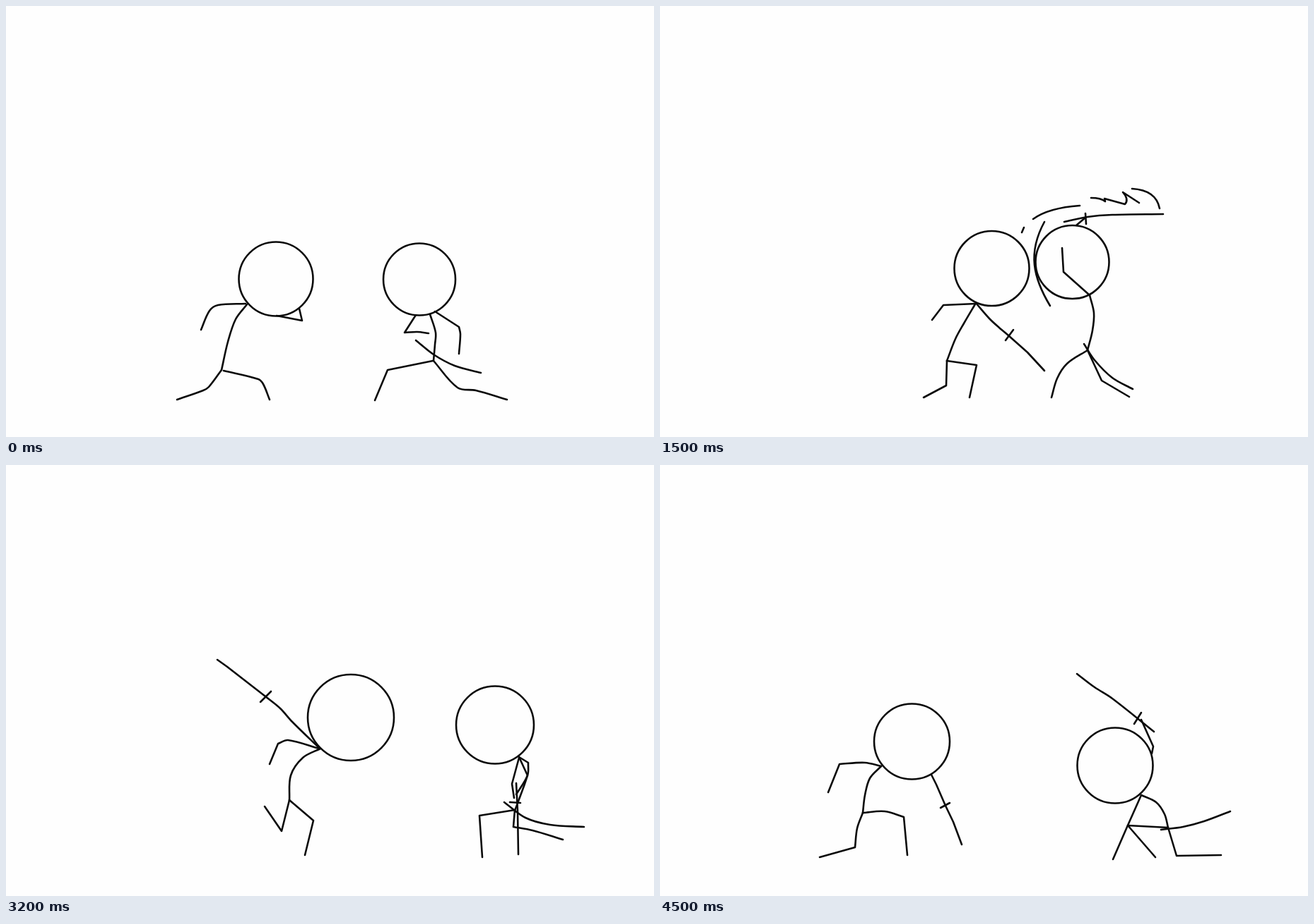
An HTML page with a canvas for the animation above (5000 ms loop, 917 by 611 pixels).

```html
<!DOCTYPE html>
<html lang="en">
<head>
<meta charset="utf-8">
<title>Stick duel</title>
<style>
  html, body { margin: 0; width: 100%; height: 100%; overflow: hidden; background: #fefefe; }
  canvas { display: block; }
</style>
</head>
<body>
<canvas id="stage" width="917" height="611"></canvas>
<script>
const ctx = document.getElementById('stage').getContext('2d');
const LOOP = 5000, STEP = 100, HOLD = 200;

// Each pose: head (x y r) | body | arm | arm | leg | leg | sword | guard | sheath
const left = {
  stance: '382 387 52.5|341 423 325 444 314 476 305 516|339 422 300 424 288 432 276 459|383 439 419 446 415 429|305 516 287 540 279 545 242 558|308 517 357 529 364 536 373 558|||',
  strike: '435.5 370 52.5|417 421 408 450 402 475 399 492|417 421 381 430 370 460|417 421 430 430 462 457 486 477|399 492 374 558|399 492 436 520 438 557|492 484 545 535|480 489 498 475|',
  guard: '469.5 372 53|447 421 430 450 418 472 406 503|447 422 401 424 385 445|447 421 466 443 480 456 493 467|406 503 405 538 373 555|406 503 448 509 438 555|493 467 520 491 544 517|489 474 500 459|',
  lunge: '179.5 388 57.5|152 440 140 460 132 475 122 505|152 440 115 468 146 480|211 437 215 437|122 505 141 523 80 566|122 505 155 508 186 520 225 557|215 437 281 452|210 445 218 432|',
  raise: '488 358 61|445 402 420 415 403 440 401 475|443 402 399 390 385 395 373 424|444 402 405 364 388 345 367 328|401 475 390 519 366 484|401 475 435 504 423 553|367 328 313 286 299 276|360 336 375 321|',
  leap: '552 172 60|536 231 520 347|536 231 507 280 480 252|536 231 580 218 667 183|520 347 464 315 479 364|520 347 505 390 492 433|667 183 768 145|661 169 673 194|',
  land: '356.5 392 53.5|313 427 297 444 290 468 287 493|313 427 290 422 254 424 238 464|384 439 391 453 404 483|287 493 279 515 276 542 226 556|287 493 318 491 345 499 350 553|404 483 415 506 427 538|397 486 410 479|'
};
const right = {
  stance: '585 387.5 51|600 437 608 463 607 480 605 503|607 433 641 455 643 465 641 493|580 438 564 463 582 462 598 464|604 503 540 516 522 559|605 503 639 541 665 545 709 558|||580 474 605 494 635 510 672 520',
  block: '676 376 47|668 423 665 443 650 462 626 485|667 423 637 436 607 420|667 423 633 446 608 422|626 485 597 497 590 515 585 546|626 485 603 511 606 556|591 431 686 377|612 415 620 424|622 480 635 496 650 514 686 525',
  swing: '583.5 363 52|608 410 614 435 612 460 605 488|608 410 571 377 569 343|589 311 602 300|605 488 576 507 562 528 554 555|605 488 625 531 664 554|572 306 605 299 640 296 712 295|602 294 603 309|600 479 615 502 640 527 669 543',
  ready: '733.5 364 53|755 414 768 452 774 475 772 492|753 414 736 437 709 476|753 414 745 430 728 458 709 476|772 492 712 501 668 560|771 492 773 527 800 531 830 554|610 426 650 452 680 465 726 482|692 472 700 462|761 484 790 499 820 508 854 518',
  brace: '692 368.5 55|726 414 738 440 733 455 720 490|726 414 739 422 738 440 722 467|726 415 716 452 719 472|720 489 670 497 674 556|720 489 718 513 745 518 788 531|722 451 724 490 725 552|713 478 728 479|705 478 735 500 770 510 818 513',
  air: '772 102 55|774 160 763 205 755 232 746 255|727 77 722 72 690 108|773 165 762 188 726 188|746 255 702 284 717 330|746 255 715 234 727 290|683 94 714 166|692 133 704 126|735 234 755 265 785 285 815 298',
  crouch: '644 426 53.5|681 468 702 478 714 495 719 514|696 409 698 399 681 361|681 468 661 513 641 559|719 514 662 511 701 556|719 514 731 554 794 553|590 296 615 315 640 331 699 378|671 367 681 351|709 517 740 513 770 505 807 491'
};

// Keys: time, pose, optional shift
const leftKeys = [
  [100, 'stance'], [400, 'raise', -55, 3], [600, 'strike'], [1000, 'strike', -58], [1500, 'guard'],
  [1900, 'lunge', 54], [2200, 'lunge', -18], [2400, 'lunge'], [2600, 'lunge', -28],
  [3100, 'raise', -101], [3200, 'raise'], [3600, 'leap'], [3900, 'leap', -60, 60],
  [4300, 'land', -18], [4500, 'land']
];
const rightKeys = [
  [100, 'stance'], [400, 'stance', 25], [600, 'block'], [1000, 'block', 65], [1500, 'swing'],
  [1900, 'ready', -84], [2200, 'ready', 8], [2400, 'ready'], [2600, 'ready', 8],
  [3200, 'brace'], [3600, 'air'], [3700, 'air', 66, -22], [3900, 'air', 120, -70],
  [4300, 'crouch', 20], [4500, 'crouch']
];

// Slashes and sparks, by the time of the step that shows them
const effects = {
  600: `M596 351C594 380 560 440 545 460C530 478 520 485 511 483L522 476 502 481
    M596 351C606 400 598 425 592 440C583 470 565 490 553 511L567 503Q562 518 555 524
    M582 305Q589 317 592 330M558 400L561 376 563 394`,
  1500: `M512 321L515 314M528 302Q550 286 594 283M610 272Q624 272 630 277L629 273 658 281
    Q664 274 655 264L678 279M668 259Q702 261 707 287M544 306C520 350 528 385 552 425`,
  2400: 'M223 455Q230 456 236 466L267 506 262 461 270 468 269 457',
  3600: `M684 187L683 209 688 203C695 245 678 270 660 305C640 345 625 365 595 387Q560 415 515 436
    M504 435C540 450 575 432 605 418C640 400 660 385 682 358L670 393Q690 365 711 335
    C735 300 742 280 747 262L752 283C762 255 768 235 766 203L777 212C781 190 778 175 775 160
    M429 406Q455 422 482 431M407 374L410 383M660 121L675 125M657 133L676 152M691 154L703 160
    M722 155L731 140M704 190L710 209M651 227L662 211M803 164L829 172M714 330L721 341`
};

// Every limb gets four points so that any two poses can blend
function parse(text) {
  return text.split('|').map((part, i) => {
    const n = part ? part.split(' ').map(Number) : [];
    if (i === 0 || !n.length) return n;
    const p = [];
    for (let k = 0; k < n.length; k += 2) p.push([n[k], n[k + 1]]);
    const pick = { 2: [0, 0, 1, 1], 3: [0, 1, 1, 2], 4: [0, 1, 2, 3] }[p.length];
    return pick.flatMap(k => p[k]);
  });
}

function track(poses, keys) {
  return keys.map(([time, name, dx = 0, dy = 0]) => ({
    time,
    limbs: parse(poses[name]).map((limb, i) =>
      limb.map((v, k) => i === 0 && k === 2 ? v : v + (k % 2 ? dy : dx)))
  }));
}

function poseAt(keys, t) {
  const i = Math.max(0, keys.findLastIndex(k => k.time <= t));
  const a = keys[i], b = keys[i + 1];
  if (!b || t <= a.time) return a.limbs;
  const u = (t - a.time) / (b.time - a.time);
  return a.limbs.map((limb, j) =>
    b.limbs[j].length ? limb.map((v, k) => v + (b.limbs[j][k] - v) * u) : limb);
}

function unit(a, b) {
  const x = b[0] - a[0], y = b[1] - a[1], d = Math.hypot(x, y) || 1;
  return [x / d, y / d];
}

// Smooth line through the points, with sharp turns kept as corners
function drawLimb(n) {
  if (!n.length) return;
  const p = [0, 2, 4, 6].map(k => [n[k], n[k + 1]]);
  const tangent = (i, side) => {
    const own = side > 0 ? unit(p[i], p[i + 1]) : unit(p[i - 1], p[i]);
    if (i === 0 || i === 3) return own;
    const a = unit(p[i - 1], p[i]), b = unit(p[i], p[i + 1]);
    return a[0] * b[0] + a[1] * b[1] < 0.75 ? own : unit(p[i - 1], p[i + 1]);
  };
  ctx.beginPath();
  ctx.moveTo(...p[0]);
  for (let i = 0; i < 3; i++) {
    const [a, b] = [p[i], p[i + 1]], s = tangent(i, 1), e = tangent(i + 1, -1);
    const d = Math.hypot(b[0] - a[0], b[1] - a[1]) / 3;
    ctx.bezierCurveTo(a[0] + s[0] * d, a[1] + s[1] * d, b[0] - e[0] * d, b[1] - e[1] * d, ...b);
  }
  ctx.stroke();
}

function drawFighter([head, ...limbs], dashed) {
  ctx.beginPath();
  ctx.arc(...head, 0, Math.PI * 2);
  ctx.stroke();
  limbs.forEach((limb, i) => {
    ctx.setLineDash(dashed && [0, 2, 3, 4].includes(i) ? [3, 3] : []);
    ctx.lineCap = ctx.getLineDash().length ? 'butt' : 'round';
    drawLimb(limb);
  });
  ctx.setLineDash([]);
  ctx.lineCap = 'round';
}

const leftTrack = track(left, leftKeys), rightTrack = track(right, rightKeys);
ctx.lineWidth = 2.6;
ctx.lineJoin = ctx.lineCap = 'round';
ctx.strokeStyle = '#0a0a0a';

function frame() {
  const now = performance.now() % LOOP;
  const t = now < HOLD ? 0 : Math.floor(now / STEP) * STEP;
  const hit = t === 3600;
  ctx.fillStyle = '#fefefe';
  ctx.fillRect(0, 0, 917, 611);
  drawFighter(poseAt(leftTrack, t));
  drawFighter(poseAt(rightTrack, t), hit);
  if (effects[t]) ctx.stroke(new Path2D(effects[t]));
  if (hit) {
    ctx.setLineDash([3, 3]);
    ctx.lineCap = 'butt';
    ctx.stroke(new Path2D('M714 166L744 233'));
    ctx.setLineDash([]);
    ctx.lineCap = 'round';
  }
  requestAnimationFrame(frame);
}
frame();
</script>
</body>
</html>
```
